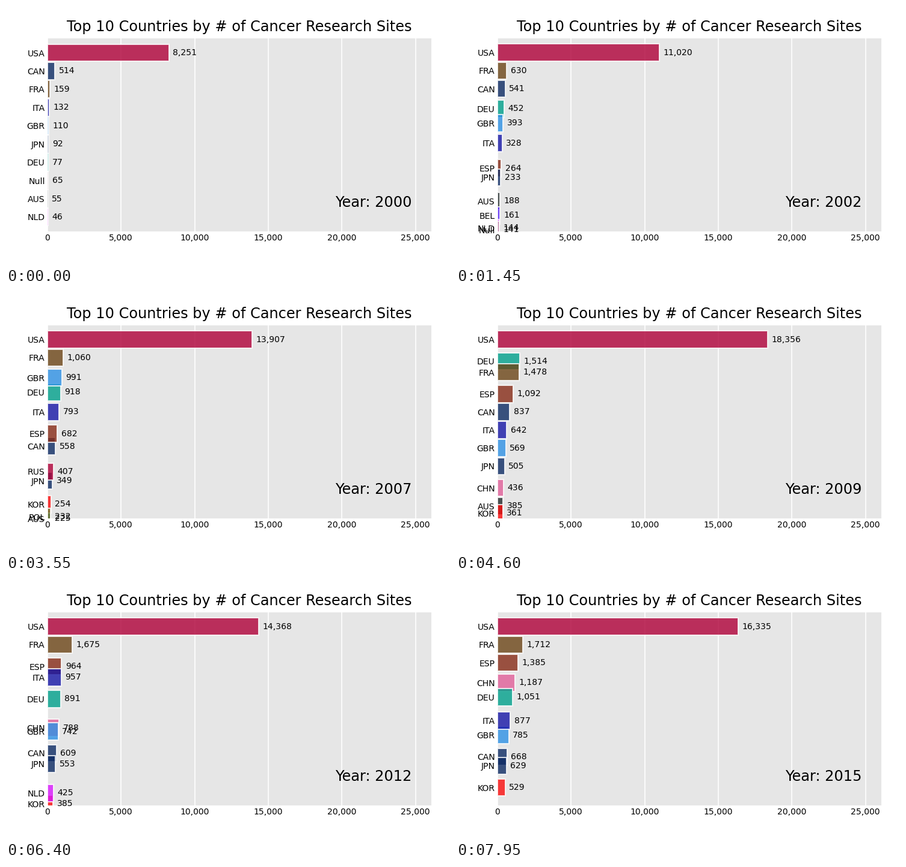
Animation of 738x432 px, one loop 8 s. Source, as a matplotlib script:

```python
import numpy as np
import matplotlib.pyplot as plt
from matplotlib.animation import FuncAnimation
from matplotlib.ticker import MultipleLocator, StrMethodFormatter

W, H, DPI = 738, 432, 144
FIRST_YEAR, STEPS, FRAMES, TOP = 2000, 10, 160, 10

COLORS = {
    "AUS": "#222A2A", "BEL": "#511CFB", "CAN": "#0D2A63", "CHN": "#E15F99",
    "DEU": "#00A08B", "ESP": "#862A16", "FRA": "#6C4516", "GBR": "#2E91E5",
    "ITA": "#1616A7", "JPN": "#0D2A63", "KOR": "#FB0D0D", "NLD": "#DA16FF",
    "Null": "#B2828D", "POL": "#6C7C32", "RUS": "#AF0038", "USA": "#AF0038",
}
NAMES = list(COLORS)

# Standings, one line per year, leader first.
ORDERS = """
USA CAN FRA ITA GBR JPN DEU Null AUS NLD
USA CAN FRA GBR ITA DEU JPN Null NLD BEL
USA FRA CAN GBR DEU ITA JPN NLD Null BEL
USA FRA CAN DEU GBR ITA ESP JPN AUS BEL
USA GBR FRA CAN DEU ESP BEL NLD ITA JPN
USA GBR FRA CAN ITA DEU JPN AUS ESP RUS
USA FRA GBR CAN DEU ITA ESP JPN RUS AUS
USA FRA GBR DEU ITA ESP CAN RUS JPN KOR
USA FRA DEU GBR ITA CAN JPN ESP POL AUS
USA DEU FRA ESP CAN ITA GBR JPN CHN AUS
USA FRA DEU ESP CAN ITA GBR JPN KOR CHN
USA FRA DEU ESP ITA GBR CAN JPN CHN KOR
USA FRA ITA ESP DEU GBR JPN CAN CHN KOR
USA FRA ESP ITA DEU CHN GBR CAN JPN NLD
USA FRA ESP DEU CHN ITA GBR CAN JPN KOR
USA FRA ESP DEU CHN JPN GBR ITA KOR CAN
USA FRA ESP CHN DEU ITA GBR CAN JPN KOR
""".split("\n")[1:-1]

# Site counts of a few ranks in a few years; the rest is interpolated.
KEY_YEARS = [0, 3, 5, 7, 9, 13, 16]
KEY_RANKS = {
    1: [8251, 11115, 10880, 13661, 18578, 14146, 16410],
    2: [514, 634, 818, 1034, 1560, 1681, 1713],
    3: [159, 554, 618, 990, 1450, 960, 1400],
    6: [92, 336, 340, 706, 630, 860, 901],
    10: [46, 165, 206, 252, 395, 440, 524],
}
OUTSIDE = 0.85  # share of tenth place held by countries not listed


def year_data(year, order):
    """Counts and bar slots (10 = leader, 0 = not listed) of all countries."""
    keys = [np.interp(year, KEY_YEARS, v) for v in KEY_RANKS.values()]
    ranks = np.arange(1, TOP + 1)
    by_rank = np.exp(np.interp(ranks, list(KEY_RANKS), np.log(keys)))
    counts = np.full(len(NAMES), OUTSIDE * by_rank[-1])
    slots = np.zeros(len(NAMES))
    at = [NAMES.index(name) for name in order.split()]
    counts[at] = by_rank
    slots[at] = TOP + 1 - ranks
    return counts, slots


def tween(table, i):
    y, step = divmod(i, STEPS)
    t = step / STEPS
    return table[y] * (1 - t) + table[y + 1] * t


values, slots = zip(*(year_data(y, o) for y, o in enumerate(ORDERS)))

# The lower limit widens for good once a bar dips under it.
lows = [min(s for s in tween(slots, i) if s > 0) for i in range(FRAMES)]
floor = np.minimum(np.minimum.accumulate(lows), 0.2)

plt.rcParams["font.family"] = "DejaVu Sans"
fig = plt.figure(figsize=(W / DPI, H / DPI), dpi=DPI, facecolor="white")
ax = fig.add_axes([68.7 / W, 55.67 / H, 638 / W, 322.68 / H])
ax.set_facecolor("0.9")
ax.set_xlim(0, 26062)
ax.grid(True, axis="x", color="white", linewidth=0.8)
ax.set_axisbelow(True)
ax.tick_params(length=0, labelsize=7, pad=2)
ax.xaxis.set_major_locator(MultipleLocator(5000))
ax.xaxis.set_major_formatter(StrMethodFormatter("{x:,.0f}"))
ax.spines[:].set_visible(False)
ax.set_title("Top 10 Countries by # of Cancer Research Sites", fontsize=12)

year_text = ax.text(0.95, 0.15, "", transform=ax.transAxes, fontsize=12,
                    ha="right", va="center")
bars = ax.barh(np.zeros(len(NAMES)), np.zeros(len(NAMES)), height=0.95,
               color=list(COLORS.values()), ec="white", linewidth=1, alpha=0.8)
labels = [ax.text(0, 0, "", fontsize=7, ha="left", va="center") for _ in NAMES]
gap = 0.01 * ax.get_xlim()[1]


def update(i):
    vals, locs = tween(values, i), tween(slots, i)
    shown = locs > 0
    for bar, label, v, y, on in zip(bars, labels, vals, locs, shown):
        bar.set_visible(on)
        label.set_visible(on)
        bar.set_y(y - bar.get_height() / 2)
        bar.set_width(v)
        label.set_position((v + gap, y))
        label.set_text(f"{v:,.0f}")
    ax.set_yticks(locs[shown], [n for n, on in zip(NAMES, shown) if on])
    ax.set_ylim(floor[i], TOP + 0.8)
    year_text.set_text(f"Year: {FIRST_YEAR + i // STEPS}")
    return [*bars, *labels, year_text]


anim = FuncAnimation(fig, update, frames=FRAMES, interval=50, repeat=True,
                     repeat_delay=0, blit=False)
plt.show()
```
